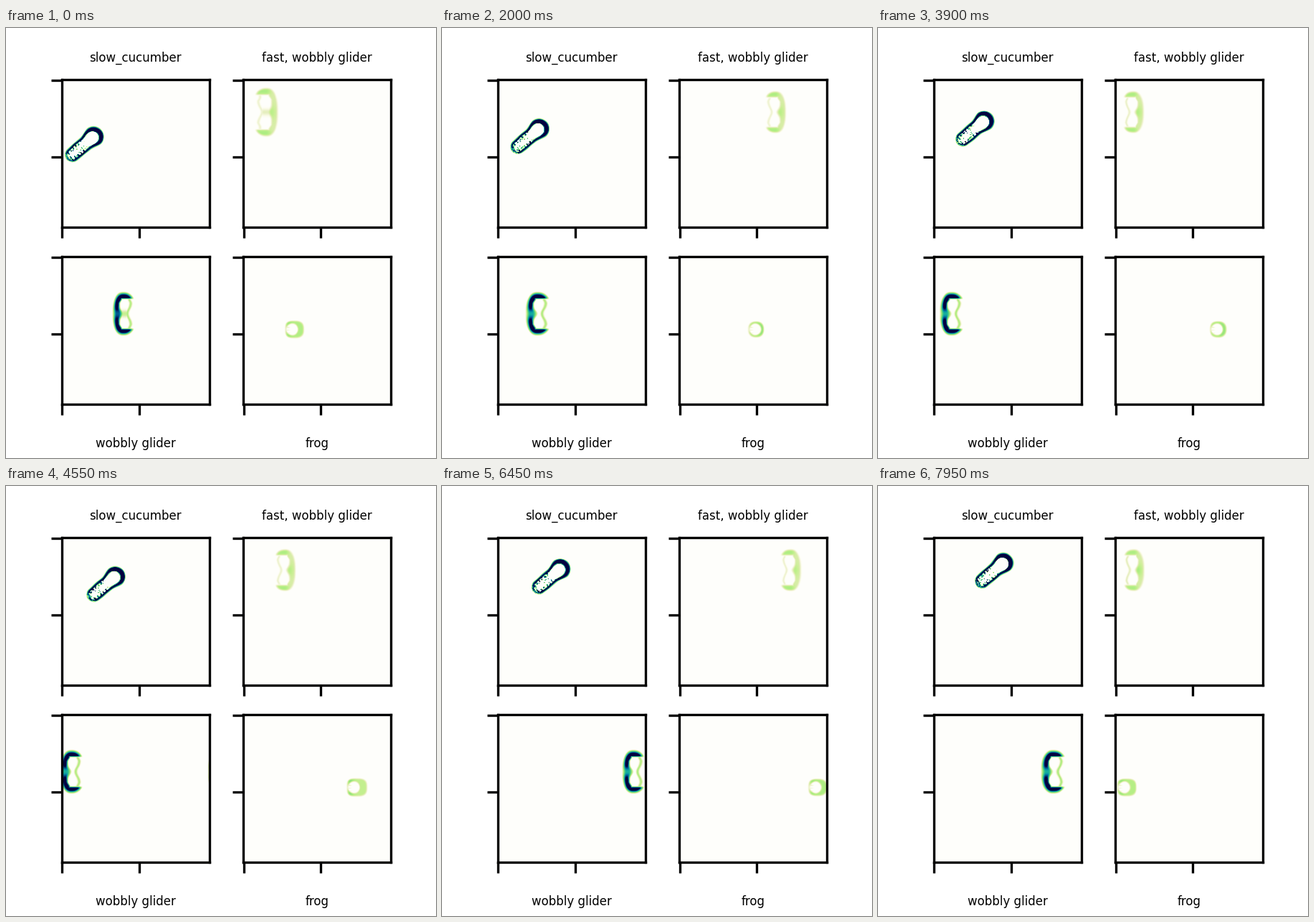
Write a matplotlib script that moves like this. It is 600 px wide and 600 px high and loops after 8 s.

```python
import numpy as np
import matplotlib.pyplot as plt
from matplotlib.animation import FuncAnimation
from matplotlib.colors import ListedColormap

FRAMES, STEP = 160, 50
CELLS, SIDE = 192, 205.91  # grid cells and panel width in pixels
MARGIN = 60                # room kept on the outer side when wrapping

# Inverted magma: ivory, green, teal, navy
CMAP = ListedColormap(1 - plt.get_cmap("magma")(np.arange(256))[:, :3])

axis = (np.arange(CELLS) + 0.5) * SIDE / CELLS
X, Y = np.meshgrid(axis, axis)
GRAIN = np.random.default_rng(7).random((CELLS, CELLS))


def ramp(lo, hi, v):
    t = np.clip((v - lo) / (hi - lo), 0, 1)
    return t * t * (3 - 2 * t)


def bump(v, width):
    return np.exp(-(v / width) ** 2)


def wrap(v):
    return (v + MARGIN) % SIDE - MARGIN


def depth(x, y, rx, ry, p):
    """Approximate distance inside a superellipse."""
    u, v = np.abs(x / rx) + 1e-6, np.abs(y / ry) + 1e-6
    rho = (u ** p + v ** p) ** (1 / p)
    slope = rho ** (1 - p) * np.hypot(u ** (p - 1) / rx, v ** (p - 1) / ry)
    return (1 - rho) / slope


def cucumber(k):
    dx, dy = X - 44.1 - 0.331 * k, Y - 79.7 + 0.278 * k
    a, b = 0.763 * dx - 0.647 * dy, 0.647 * dx + 0.763 * dy
    back = ramp(2, -16, a)
    rear = ramp(-12, -22, a)
    outer = 15.4 - 3.6 * back - 0.8 * ramp(-25, -48, a)
    over = np.maximum(a, 0) + np.minimum(a + 39, 0)
    s = outer - np.hypot(over, b)

    teeth = np.sin(1.3 * a + 0.6 * np.sign(b) + 0.25 * k) + 1.6 * (GRAIN - 0.5)
    thick = 6.3 + 2.8 * ramp(-6, 10, a) - 0.9 * back
    thick = thick + rear * (2.8 * (teeth > 0.4) - 0.5)
    wall = ramp(0.2, 3.4, s) * ramp(0, 1.2, thick - s)
    tail = ramp(-40, -47, a)
    wall *= 1 - tail * (0.2 + 0.5 * (GRAIN > 0.7))
    specks = rear * (s > 5) * (GRAIN > 0.96) * 0.9
    return np.clip(1.4 * wall + specks, 0, 1)


def glider(d, b, width, tall, soft):
    """Band, trailing line and depth of a two-lobed glider; d runs back."""
    d = d * 34 / width
    s = depth(d - 17, b, np.where(d < 17, 17, 20.5), tall, 2.4)
    lip = tall * 0.66
    inner = 11.5 + 5.5 * bump(b, 6) + 3 * ramp(lip - 7, lip, np.abs(b))
    hole = np.minimum(d - inner, lip - np.abs(b))
    band = ramp(0.3, soft, s) * ramp(1.5, -2.2 - 4 * bump(b, 8), hole)
    band *= ramp(34.5, 31, d)

    line = 23 + 5 * (1 - bump(b, 8.5)) - 2.5 * ramp(14, 21, np.abs(b))
    rear = bump(d - line, 1.9) * ramp(lip + 2, lip - 2, np.abs(b))
    link = bump(b, 5) * ramp(10, 14, d) * ramp(25, 21, d)
    return d, band, rear, link


def wobbly(k):
    d, b = wrap(X - 69.0 + 0.8 * k), Y - 79.7
    width = 35.2 - 2 * np.cos(2 * np.pi * k / 110)
    start = np.exp(-k / 14)
    d, band, rear, link = glider(d, b, width, 31.8, 7.5)
    band *= 1.25 * (1 - (0.5 - 0.15 * start) * bump(b, 8))
    return np.clip(np.maximum(band, np.maximum(0.26 * rear, 0.2 * start * link)), 0, 1)


def fast(k):
    start = np.exp(-k / 9)
    d, b = wrap(49.2 + 2.55 * k + 2 * start - X), Y - 45.4
    beat = np.cos(2 * np.pi * (k - 20) / 44)
    d, band, rear, link = glider(d, b, 33 + 4 * start, 31.2 + 5 * start, 5.5)
    core = bump(b, 9) * bump(d - 12, 6)
    caps = bump(np.abs(b) - 25 - 4 * start, 5) * ramp(8, 18, d)
    band *= 0.155 + (0.1 + 0.03 * beat) * core + 0.1 * caps
    pale = 0.11 + 0.02 * beat
    return np.maximum(band, np.maximum(pale * rear, 0.12 * start * link))


def frog(k):
    wide = np.cos(2 * np.pi * (k / 32 - 0.8))
    big = (wide + 1) / 2
    width = 28.6 + 3.4 * wide
    x, y = wrap(X - 56.6 - 0.945 * k), Y - 101.5
    s = depth(x - width / 2, y, width / 2, 12.4 + 1.8 * big, 2.3 + 0.6 * big)
    hole = depth(x - 11.8, y, 7.6, 7.8, 2)
    front = ramp(6, 18, x)
    tone = (0.3 - 0.02 * big) * (1 - front) + (0.33 - 0.13 * big) * front
    tone = tone - 0.14 * (1 - front) * bump(x - 2, 6) * bump(y, 7)
    tone = tone + 0.1 * big * bump(x - 6, 4) * bump(np.abs(y) - 9, 3)
    ring = tone * ramp(0, 4.2, s) * ramp(1.2, -2.2, hole)
    streaks = 0.08 * (np.sin(1.5 * y) > 0.3) * ramp(11, 5, x) * ramp(2, 4, s)
    return np.maximum(ring, streaks)


fig, axes = plt.subplots(2, 2, figsize=(2, 2), dpi=300, facecolor="white")
fig.subplots_adjust(left=0.125, right=0.9, bottom=0.125, top=0.88,
                    wspace=0.2, hspace=0.2)
PANELS = [
    ("slow_cucumber", cucumber, 180.68, 47),
    ("fast, wobbly glider", fast, 434.32, 47),
    ("wobbly glider", wobbly, 180.68, 585),
    ("frog", frog, 434.32, 585),
]

views = []
for ax, (name, field, mid, base) in zip(axes.flat, PANELS):
    views.append((ax.imshow(field(0), cmap=CMAP, vmin=0, vmax=1), field))
    ax.set_xticks([0, 100], ["", ""])
    ax.set_yticks([0, 100], ["", ""])
    fig.text(mid / 600, 1 - base / 600, name, fontsize=4,
             family="DejaVu Sans", ha="center", va="baseline")


def update(k):
    for view, field in views:
        view.set_data(field(k))
    return [view for view, _ in views]


anim = FuncAnimation(fig, update, frames=FRAMES, interval=STEP,
                     repeat=True, repeat_delay=0, blit=False)
plt.show()
```
